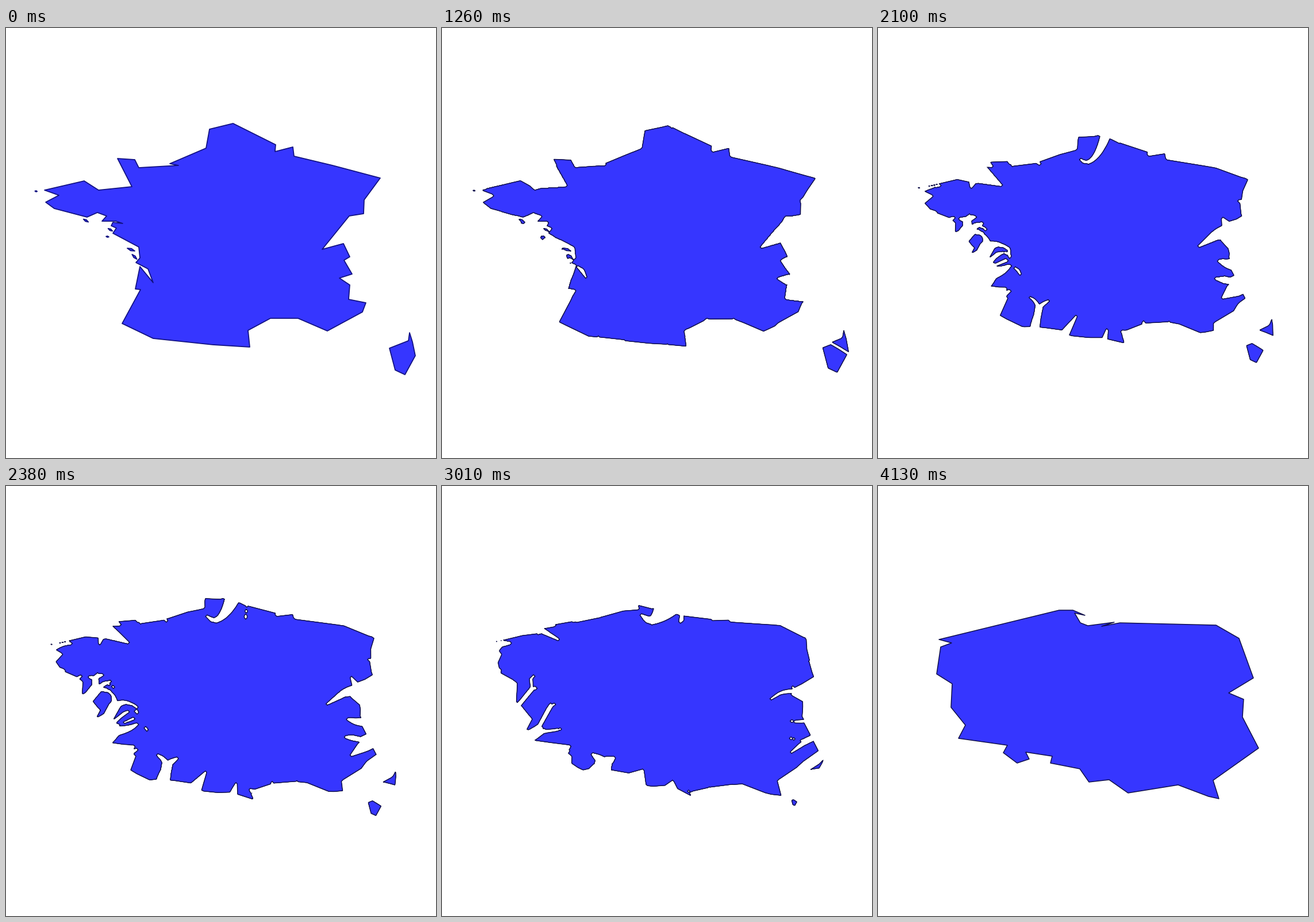
A matplotlib script that plays this animation: 748 by 748 pixels, repeating every 4.83 s.

```python
import numpy as np
import matplotlib.pyplot as plt
from matplotlib.animation import FuncAnimation
from matplotlib.patches import PathPatch
from matplotlib.path import Path

SIZE, TICK, HOLD, STEPS = 748, 70, 10, 50
FILL = "#3636ff"
REACH = 125      # farthest any point has to travel
TOL = 0.2
CLOSE = 2        # radius of the closing disc

# Corner points of the two outlines; everything between is computed.
MAINLAND = [
    (395, 166), (469, 203), (468, 215), (499, 207), (501, 223), (568, 239),
    (651, 261), (623, 299), (622, 323), (597, 327), (550, 385), (587, 375),
    (598, 398), (588, 404), (602, 428), (580, 435), (598, 447), (596, 472),
    (626, 478), (620, 494), (559, 527), (508, 505), (460, 505), (421, 526),
    (424, 555), (360, 551), (256, 540), (202, 514), (234, 455), (225, 454),
    (233, 415), (256, 443), (247, 419), (226, 408), (233, 400), (231, 381),
    (186, 357), (192, 348), (183, 344), (186, 338), (203, 340), (191, 336),
    (167, 336), (175, 327), (159, 321), (141, 329), (84, 314), (69, 303),
    (92, 291), (67, 282), (136, 266), (161, 282), (219, 276), (194, 227),
    (224, 229), (231, 243), (300, 239), (285, 236), (348, 209), (354, 176)]
SOUTH_ISLE = [(702, 530), (707, 546), (712, 570), (694, 603), (677, 595),
              (667, 557), (700, 544)]
FINAL = [
    (106, 267), (315, 216), (339, 216), (360, 225), (342, 221), (352, 238),
    (365, 243), (411, 237), (389, 244), (421, 238), (588, 242), (628, 265),
    (653, 334), (610, 360), (636, 371), (634, 402), (662, 456), (583, 512),
    (593, 544), (575, 540), (522, 520), (435, 534), (402, 511), (367, 515),
    (351, 492), (300, 482), (303, 470), (257, 463), (263, 475), (242, 482),
    (218, 464), (225, 451), (140, 439), (152, 416), (127, 385), (129, 344),
    (102, 327), (109, 280), (128, 273)]


def sliver(x, y, half, tilt=30):
    """Thin diamond-shaped islet."""
    c, s = np.cos(np.radians(tilt)), np.sin(np.radians(tilt))
    thin = 0.6 + half / 5
    corners = [(-half, 0), (0, -thin), (half, 0), (0, thin)]
    return [(x + u * c - v * s, y + u * s + v * c) for u, v in corners]


ISLETS = [sliver(139, 335, 5), sliver(181.5, 351, 4.5), sliver(176.5, 363, 2.5, 10),
          sliver(217.5, 385.5, 7, 20), sliver(223.5, 398, 6, 45)]
SPECK = sliver(52.3, 284, 2, 10)

X0, X1, Y0, Y1 = 40, 722, 155, 615
X, Y = np.meshgrid(np.arange(X0, X1, dtype=np.float32),
                   np.arange(Y0, Y1, dtype=np.float32))


def sample(field, x, y):
    """Bilinear lookup in a grid field."""
    h, w = field.shape
    x = np.clip(x - X0, 0, w - 1.01)
    y = np.clip(y - Y0, 0, h - 1.01)
    i, j = x.astype(int), y.astype(int)
    u, v = x - i, y - j
    flat, k = field.ravel(), j * w + i
    top = flat[k] * (1 - u) + flat[k + 1] * u
    low = flat[k + w] * (1 - u) + flat[k + w + 1] * u
    return top * (1 - v) + low * v


class Region:
    """Signed distance (positive inside) and nearest boundary point."""

    def __init__(self, rings):
        best = np.full(X.shape, 1e12, np.float32)
        self.nx, self.ny = X.copy(), Y.copy()
        inside = np.zeros(X.shape, bool)
        for ring in rings:
            for (px, py), (qx, qy) in zip(ring, ring[1:] + ring[:1]):
                dx, dy = qx - px, qy - py
                t = ((X - px) * dx + (Y - py) * dy) / (dx * dx + dy * dy)
                t = np.clip(t, 0, 1)
                ex, ey = px + t * dx, py + t * dy
                d = (X - ex) ** 2 + (Y - ey) ** 2
                near = d < best
                best[near] = d[near]
                self.nx[near], self.ny[near] = ex[near], ey[near]
                if dy:
                    inside ^= ((py > Y) != (qy > Y)) & (X < px + (Y - py) * dx / dy)
        self.sd = np.where(inside, 1, -1).astype(np.float32) * np.sqrt(best)


def slide(own, other, k):
    """Own points pulled to the nearest point of other; k is the share left."""
    out = np.full(X.shape, -1, np.float32)
    m = (other.sd <= 0) & (-other.sd < k * REACH + 2)
    bx, by = other.nx[m], other.ny[m]
    dx, dy = (X[m] - bx) / k, (Y[m] - by) / k
    gap = np.hypot(dx, dy) + sample(other.sd, bx + dx, by + dy)
    out[m] = np.minimum(sample(own.sd, bx + dx, by + dy) * k, TOL - gap)
    return out


SPAN = range(-CLOSE, CLOSE + 1)
DISC = [(i, j) for i in SPAN for j in SPAN if i * i + j * j <= CLOSE ** 2]


def spread(f, pick):
    out = f.copy()
    for shift in DISC:
        pick(out, np.roll(f, shift, (0, 1)), out=out)
    return out


def ease(t):
    return 2 * t * t if t < 0.5 else 1 - 2 * (1 - t) ** 2


def outline(rings):
    paths = [Path(np.vstack([r, r[:1]]), closed=True) for r in rings]
    return Path.make_compound_path(*paths)


fig = plt.figure(figsize=(SIZE / 100, SIZE / 100), dpi=100, facecolor="white")
ax = fig.add_axes([0, 0, 1, 1])

START = [MAINLAND, SOUTH_ISLE] + ISLETS
first, last = Region(START), Region([FINAL])


def blend(a):
    both = np.minimum(first.sd, last.sd)
    both = np.where(both > 0, np.maximum(both, 0.1), both)
    f = np.maximum(slide(first, last, 1 - a), slide(last, first, a))
    f = np.clip(np.maximum(f, both), -1, 1).astype(np.float32)
    f = spread(spread(f, np.maximum), np.minimum)
    lines = ax.contour(X, Y, f, levels=[0])
    path = lines.get_paths()[0]
    lines.remove()
    # The speck is finer than the grid, so it travels as a polygon.
    speck = np.array(SPECK) * (1 - a) + np.array(FINAL[0]) * a
    return Path.make_compound_path(path, outline([speck]))


shapes = ([outline(START + [SPECK])]
          + [blend(ease(i / STEPS)) for i in range(1, STEPS)]
          + [outline([FINAL])])

ax.set_xlim(0, SIZE)
ax.set_ylim(SIZE, 0)
ax.axis("off")
patch = PathPatch(shapes[0], facecolor=FILL, joinstyle="round")
ax.add_patch(patch)


def draw(n):
    i = min(max(n - HOLD + 1, 0), STEPS)
    patch.set_path(shapes[i])
    patch.set_edgecolor("#101080" if i == 0 else "#0c0c46")
    patch.set_linewidth(1.25 if i == 0 else 1.05)
    return [patch]


anim = FuncAnimation(fig, draw, frames=STEPS + 2 * HOLD - 1, interval=TICK,
                     repeat=True, repeat_delay=0, blit=False)
plt.show()
```
